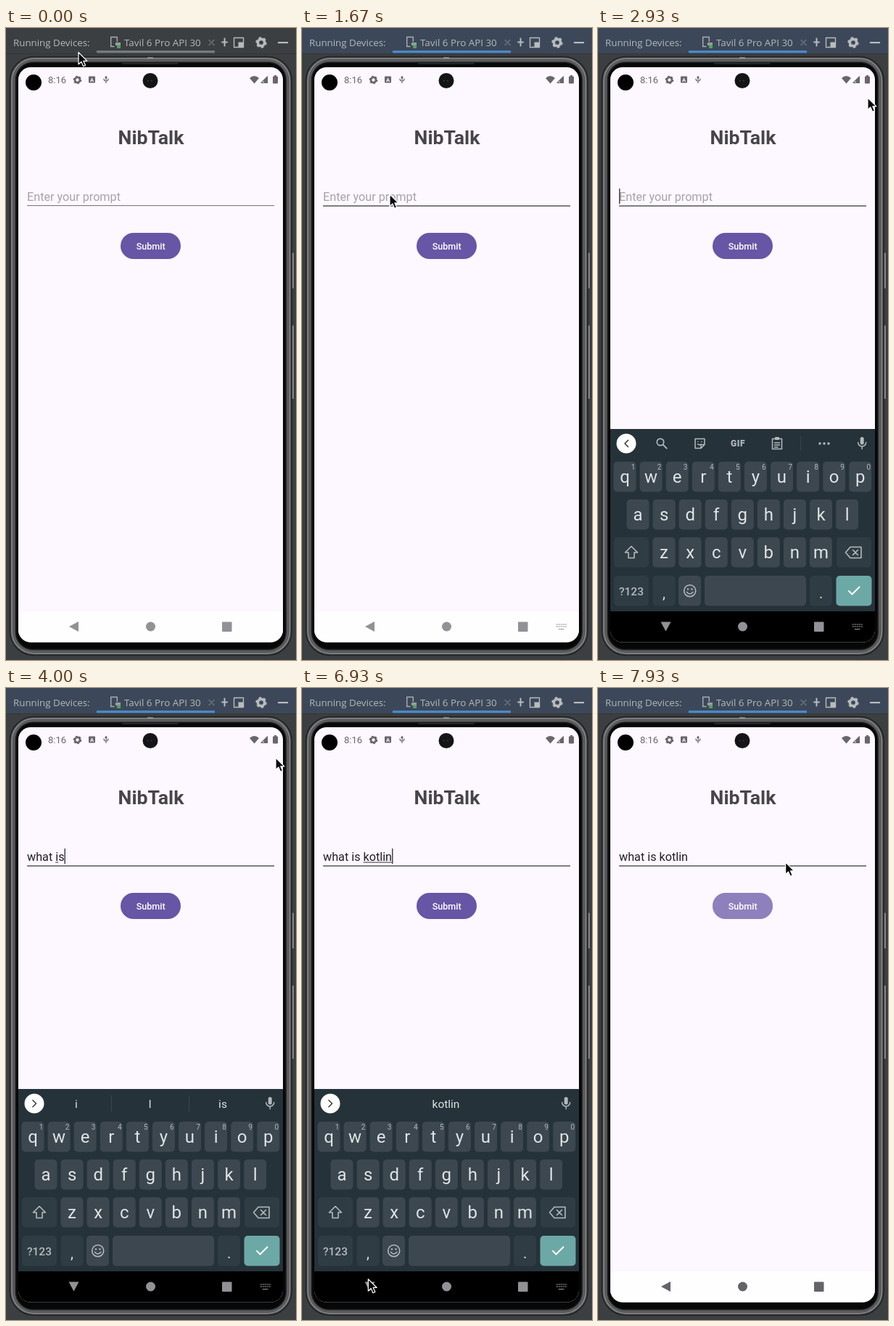
An HTML page that plays this animation: 400x870 px, repeating every 8 s.

```html
<!DOCTYPE html>
<html lang="en">
<head>
<meta charset="utf-8">
<title>Running device</title>
<style>
html, body { margin: 0; width: 100%; height: 100%; overflow: hidden; background: #3c3f41; }
svg { display: block; width: 400px; height: 870px; }
text { font-family: Roboto, "Open Sans", sans-serif; white-space: pre; }
.ide { font-family: "Open Sans", "Noto Sans", sans-serif; }
.line { fill: none; stroke-width: 1.6; stroke-linecap: round; stroke-linejoin: round; }
</style>
</head>
<body>
<svg id="stage" viewBox="0 0 400 870"></svg>
<script>
const LOOP = 8000, FONT = 16.2;
const stage = document.getElementById('stage');

// ---- markup helpers ----
const rect = (x, y, w, h, fill, r = 0, more = '') =>
  `<rect x="${x}" y="${y}" width="${w}" height="${h}" rx="${r}" fill="${fill}" ${more}/>`;
const circle = (x, y, r, fill, more = '') => `<circle cx="${x}" cy="${y}" r="${r}" fill="${fill}" ${more}/>`;
const shape = (d, fill, more = '') => `<path d="${d}" fill="${fill}" ${more}/>`;
const line = (d, color, w = 1.6, more = '') =>
  `<path class="line" d="${d}" stroke="${color}" style="stroke-width:${w}" ${more}/>`;
const text = (x, y, size, str, fill, more = '') =>
  `<text x="${x}" y="${y}" font-size="${size}" fill="${fill}" ${more}>${str}</text>`;
const mid = 'text-anchor="middle"';
const gear = (x, y, r, color) =>
  circle(x, y, r * .62, 'none', `stroke="${color}" stroke-width="${r * .48}"`) +
  circle(x, y, r * .88, 'none',
    `stroke="${color}" stroke-width="${r * .3}" stroke-dasharray="${r * .46}" pathLength="${r * 5.52}"`);

// ---- parts ----
function header() {
  return rect(0, 0, 400, 35, '#3c3f41', 0, 'id="bar"') +
    rect(0, 35, 400, 1, '#323436') +
    text(10, 24.5, 13.3, 'Running Devices:', '#b5b8ba', 'class="ide"') +
    rect(125, 31, 163, 3.4, '#747a80', 0, 'id="tab"') +
    line('M149 25.5h-4.3v-13h8.6v6', '#a9adb0', 1.4) +
    rect(151, 20, 7, 4, '#9a9ea1') + rect(153, 23.5, 5, 4.5, '#4fa35a', 1) +
    text(163, 24.5, 13.4, 'Tavil 6 Pro API 30', '#b5b8ba', 'class="ide"') +
    line('M280 16.5l7 7m0-7l-7 7', '#73787b', 1.2) +
    line('M301.5 14.5v10M298 19.5h7', '#b8bbbd', 2) +
    line('M314.5 13.5h13v13h-13z', '#b8bbbd', 1.4) + rect(320.5, 19.5, 7, 7, '#b8bbbd') +
    gear(352, 20, 7.5, '#b8bbbd') + rect(375, 19, 14, 2.2, '#b8bbbd');
}

function device() {
  const ring = (d, r, fill, stroke, w) =>
    rect(5.5 + d, 39.5 + d, 388.5 - 2 * d, 824 - 2 * d, fill, r, `stroke="${stroke}" stroke-width="${w}"`);
  const button = (y, h) => rect(393, y, 4.5, h, '#858789', 1, 'stroke="#2a2b2c" stroke-width=".8"');
  return button(309, 50) + button(409, 102) +
    ring(0, 33, '#48494a', '#222324', 1.6) + ring(2.6, 30.5, '#4c4d4e', '#838485', 1.8) +
    ring(5.4, 27, '#4c4d4e', '#5f6061', 1.6) + ring(8, 24, '#070708', '#1b1c1d', 1.4) +
    rect(195, 40, 8, 2, '#8a8c8e') + rect(160, 48, 78, 2, '#252628', 1);
}

function statusBar() {
  const c = '#68666b';
  return circle(38, 75, 11, '#000') + text(58, 76, 13, '8:16', c) + gear(98.5, 71.5, 5.7, c) +
    rect(114, 66.5, 9, 9, c, 1) + text(118.5, 74, 7.5, 'A', '#fdf7ff', mid + ' font-weight="700"') +
    line('M138 66.5v5m-3-1.5a3 3 0 0 0 6 0m-3 3v2.5', c, 1.2) + circle(138, 68, 1.6, c) +
    circle(199, 72.5, 10.5, '#141416') + circle(196, 72.5, .9, '#3e3e44') + circle(201, 72.5, .9, '#3e3e44') +
    shape('M336 69q6.5-6 13 0l-6.5 7.5z', c) + line('M352 75.5l8.5-8.5v8.5z', c, 1.2) +
    shape('M355.5 72v4h5.5v-9.5z', c) + rect(368, 66.5, 7, 10, c, 1) + rect(370, 65, 3, 2, c);
}

function app() {
  return text(200, 160, 26.7, 'NibTalk', '#47454a', mid + ' font-weight="700"') +
    text(29, 238, FONT, 'Enter your prompt', '#a7a2aa', 'id="hint"') +
    text(29, 238, FONT, '', '#201e23', 'id="typed"') +
    rect(0, 239.5, 0, 1, '#333', 0, 'id="word"') +
    rect(29, 221, 1.4, 21, '#3b383e', 0, 'id="caret"') +
    rect(29, 244, 341, 1, '#77717b', 0, 'id="rule"') +
    rect(158, 282, 83, 36, '#6755a5', 18) +
    rect(158, 282, 83, 36, '#fff', 18, 'id="ripple"') +
    text(199.7, 304.8, 12.6, 'Submit', '#fff', mid + ' font-weight="500"');
}

function keyboard() {
  const KEY = '#3c474f', DIM = '#303c44', INK = '#dfe3e5', SOFT = '#b3babe';
  const key = (x, y, w, fill = KEY) => rect(x, y, w, 41.5, fill, 5);
  const row = (keys, x0, y) => [...keys].map((ch, i) => {
    const x = x0 + 36.08 * i;
    return key(x - 15.5, y, 31) + text(x, y + 28.5, 24, ch, INK, mid);
  }).join('');
  const digits = [...'1234567890'].map((d, i) => text(48.5 + 36.08 * i, 608, 10, d, SOFT, mid)).join('');
  const mic = rect(361.7, 563, 5, 10.5, SOFT, 2.5) + line('M358.7 570.5a5.5 5.5 0 0 0 11 0m-5.5 6v3', SOFT, 1.5);
  const tools = line('M41.5 567.5l-4.5 4.5l4.5 4.5', '#444', 1.7) +
    circle(86, 570, 4.7, 'none', `stroke="${SOFT}" stroke-width="1.7"`) + line('M89.7 573.7l5 5', SOFT, 1.8) +
    line('M134 565.5h13v8l-5 5h-8zM142 578.5v-5h5M138 569.5v.1m5 0v.1m-5.5 3q2 2 4 .5', SOFT, 1.5) +
    text(193, 576.3, 12, 'GIF', SOFT, mid + ' font-weight="900" letter-spacing=".6"') +
    line('M240.5 565.5h13v14h-13zM243.5 571h7m-7 3h7m-7 3h4.5', SOFT, 1.5) + rect(244, 563, 6, 4, SOFT, 1) +
    rect(279, 562, 1, 20, '#34424a') + [306, 312, 318].map(x => circle(x, 572, 1.7, SOFT)).join('');
  const hints = line('M37 567.5l4.5 4.5l-4.5 4.5', '#444', 1.7) +
    `<g id="bars">${rect(145, 561, 1, 22, '#3a474f')}${rect(252, 561, 1, 22, '#3a474f')}</g>` +
    [97, 198.5, 299].map(x => text(x, 577.5, 15.5, '', INK, mid + ' class="guess"')).join('');
  return rect(17, 552, 365, 300, '#263239') + circle(39, 572, 13.5, '#fff') + mic +
    `<g id="tools">${tools}</g><g id="hints">${hints}</g>` +
    row('qwertyuiop', 37, 597) + digits + row('asdfghjkl', 55, 649) +
    key(22, 701, 48, DIM) + line('M46 713.5l-8.5 8.5h4.5v7.5h8v-7.5h4.5z', SOFT) +
    row('zxcvbnm', 91, 701) +
    key(329, 701, 48, DIM) + line('M348 714.5h15v15h-15l-6.5-7.5zM351.5 718.5l7 7m0-7l-7 7', SOFT) +
    key(22, 754, 48, DIM) + text(46, 780.5, 15.5, '?123', SOFT, mid + ' font-weight="500"') +
    key(75.5, 754, 31, DIM) + text(91, 785, 20, ',', INK, mid) +
    key(111, 754, 31) + circle(126.7, 774.7, 8, 'none', `stroke="${SOFT}" stroke-width="1.6"`) +
    circle(124, 772.5, 1.2, SOFT) + circle(129.5, 772.5, 1.2, SOFT) + line('M122.5 776.5q4.2 5 8.4 0', SOFT) +
    key(147, 754, 140) + key(292, 754, 31, DIM) + text(307.7, 785, 20, '.', INK, mid) +
    key(328.5, 754, 49, '#6ca9a6') + line('M346 775l4.5 4.5l10-10', '#fff', 1.9);
}

function navIcons() {
  const dots = [0, 1, 2, 3, 4].map(i => `M${351 + 3 * i} 821h1.5m-1.5 3h1.5`).join('') + 'M354 827.5h7';
  return `<g id="nav">${shape('M6.5-7v14l-13-7z', 'inherit', 'id="back"')}
    <circle cx="199.5" cy="824" r="6.5"/><rect x="298" y="817.5" width="13.5" height="13.5" rx="1"/></g>` +
    line(dots, '#98979b', 1.2, 'id="ime"');
}

stage.innerHTML = `<clipPath id="glass">${rect(17, 54, 365, 791.5, '#fff', 17)}</clipPath>` +
  rect(0, 0, 400, 870, '#3c3f41') + header() + device() +
  `<g clip-path="url(#glass)">${rect(17, 54, 365, 792, '#fdf7ff')}${rect(17, 803, 365, 43, '#fefdff')}
    ${statusBar()}${app()}<g id="kb">${keyboard()}</g>
    ${rect(17, 803, 365, 43, '#000', 0, 'id="dark"')}${navIcons()}</g>` +
  shape('M0 0v16.5l3.9-3.5l2.7 6.2l3-1.3l-2.7-6h5z', '#0a0a0a',
    'id="mouse" stroke="#fff" stroke-width="1.2" stroke-linejoin="round"');

// ---- motion ----
const $ = id => document.getElementById(id);
const set = (id, attrs) => { for (const k in attrs) $(id).setAttribute(k, attrs[k]); };
const show = (id, on) => set(id, { visibility: on ? 'visible' : 'hidden' });
const ramp = (t, a, b) => Math.min(1, Math.max(0, (t - a) / (b - a)));
const pen = document.createElement('canvas').getContext('2d');
const width = s => { pen.font = `${FONT}px Roboto, "Open Sans", sans-serif`; return pen.measureText(s).width; };

const PHRASE = 'what is kotlin';
const KEY_TIMES = [3470, 3530, 3600, 3670, 3770, 3870, 3970, 4130, 4330, 4470, 4600, 4730, 4800, 4930];
const typedAt = t => PHRASE.slice(0, KEY_TIMES.filter(k => k <= t).length);
const lastWord = s => s.split(' ').pop();
const GUESSES = {
  w: ['w', 'W', 'we'], wh: ['wh', 'what', 'why'], wha: ['wha', 'what', 'who'], what: ['what', 'What', 'whats'],
  i: ['i', 'I', 'is'], is: ['is', 'Is', 'isn'], '': ['the', 'this', 'it'],
  k: ['k', 'K', 'know'], ko: ['ko', 'KO', 'to'], kot: ['kot', 'not', 'lot'], kotl: ['kotl', 'kotlin', 'hotel'],
  kotli: ['', 'kotlin', ''], kotlin: ['', 'kotlin', '']
};

// time, x, y
const PATH = [[0, 100, 33.5], [70, 100, 33.5], [600, 121, 229], [2200, 121, 229], [2600, 372, 96],
  [5950, 372, 96], [6650, 91, 815], [6930, 91, 815], [7130, 154, 527], [7400, 200, 296],
  [7680, 200, 296], [7930, 258.5, 240], [8000, 266, 234]];

function mouseAt(t) {
  const i = Math.max(1, PATH.findIndex(p => p[0] > t));
  const [a, x, y] = PATH[i - 1], [b, u, v] = PATH[i];
  let q = ramp(t, a, b);
  if (b < 7000) q = q * q * (3 - 2 * q);
  return [x + (u - x) * q, y + (v - y) * q];
}

function draw(t) {
  const focused = t >= 800, editing = t >= 1400;
  const closing = t >= 7070;
  const open = closing ? 1 - ramp(t, 7070, 7198) : ramp(t, 1700, 1900);
  const typed = typedAt(t), lagged = typedAt(t - 70);

  set('bar', { fill: focused ? '#3c4859' : '#3c3f41' });
  set('tab', { fill: focused ? '#4a88c7' : '#747a80' });
  set('mouse', { transform: `translate(${mouseAt(t)})` });

  show('hint', !typed);
  $('typed').textContent = typed;
  const end = 29 + width(typed);
  const start = 29 + width(lagged.slice(0, lagged.lastIndexOf(' ') + 1));
  set('word', { x: start, width: closing || typed.endsWith(' ') ? 0 : width(lastWord(lagged)) });
  const typing = t >= KEY_TIMES[0] && t < 5300;
  set('caret', { x: end });
  show('caret', t >= 1800 && t < 7700 && (typing || (t - 800) % 1000 < 500));
  set('rule', { height: editing ? 1.8 : 1, fill: editing ? '#757078' : '#77717b' });
  set('ripple', { opacity: .25 * ramp(t, 7640, 7840) });

  set('kb', { opacity: open, transform: `translate(0 ${104 * (1 - open)})` });
  show('tools', !typed);
  show('hints', typed);
  const guess = closing ? ['', '', ''] : GUESSES[lastWord(lagged)];
  document.querySelectorAll('.guess').forEach((el, i) => { el.textContent = typed ? guess[i] : ''; });
  show('bars', typed && !closing && guess[0]);

  set('dark', { opacity: closing ? 0 : open });
  set('nav', { fill: !closing ? '#929196' : open ? '#b4b5b9' : '#656368' });
  set('back', { transform: `translate(93.5 824) rotate(${-90 * open})` });
  show('ime', editing && !closing);
}

function tick(now) {
  draw(now % LOOP);
  requestAnimationFrame(tick);
}
draw(0);
requestAnimationFrame(tick);
</script>
</body>
</html>
```
